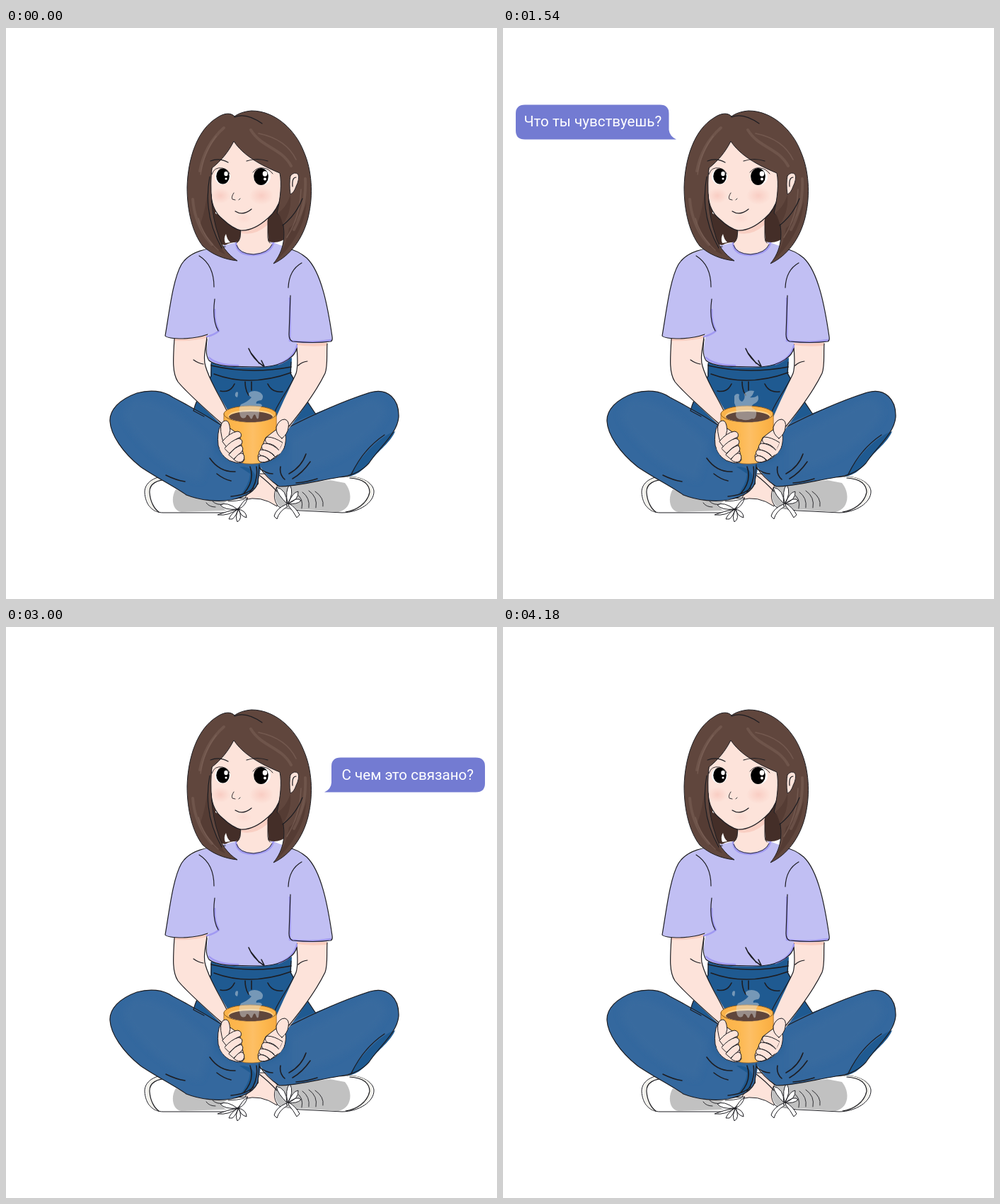
Write an HTML page that moves like this. It is 694 px wide and 807 px high and loops after 4270 ms.

```html
<!DOCTYPE html>
<html lang="ru">
<head>
<meta charset="utf-8">
<title>Что ты чувствуешь?</title>
<style>
html, body { margin: 0; width: 100%; height: 100%; overflow: hidden; background: #fff; }
svg { display: block; width: 694px; height: 807px; }
path, ellipse { stroke-linecap: round; stroke-linejoin: round; }
.ink { fill: none; stroke: #1d1d22; stroke-width: 1.2; }
.fine { stroke-width: .9; }
.bold { stroke-width: 1.6; }
.edge > * { stroke: #1d1d22; stroke-width: 1; }
.skin { fill: #fde3da; }
.denim { fill: #34689e; }
.shade { fill: #1f5a91; }
.hair { fill: #60463d; }
.gloss { fill: none; stroke: #80665c; }
.bubble { fill: #737bd2; animation: 4270ms linear infinite; opacity: 0; }
.bubble text { font: 400 20.6px Roboto, "Noto Sans", sans-serif; fill: #fff; }
#ask { animation-name: ask; }
#why { animation-name: why; }
.steam path { fill: #dde2e5; opacity: 0; }

@keyframes ask {
  0%, 23.42% { opacity: 0; transform: translateY(36px); }
  24.59% { opacity: .09; transform: translateY(33px); }
  31.15% { opacity: .8; transform: translateY(9px); }
  34.66%, 52.93% { opacity: 1; transform: none; }
  55.97% { opacity: .78; transform: translateY(-8.5px); }
  62.53% { opacity: .15; transform: translateY(-29.5px); }
  64.17%, 100% { opacity: 0; transform: translateY(-30px); }
}
@keyframes why {
  0%, 54.8% { opacity: 0; transform: translateY(36px); }
  55.97% { opacity: .09; transform: translateY(33px); }
  62.53% { opacity: .8; transform: translateY(9px); }
  66.04%, 85.48% { opacity: 1; transform: none; }
  88.29% { opacity: .78; transform: translateY(-6px); }
  93.68% { opacity: .14; transform: translateY(-23px); }
  95.32%, 100% { opacity: 0; transform: translateY(-23.5px); }
}
</style>
</head>
<body>
<svg viewBox="0 0 694 807">
  <defs>
    <radialGradient id="blush">
      <stop offset="0" stop-color="#f8c9bf" stop-opacity=".85"/>
      <stop offset="1" stop-color="#f8c9bf" stop-opacity="0"/>
    </radialGradient>
    <linearGradient id="mug">
      <stop offset="0" stop-color="#fbb147"/>
      <stop offset=".35" stop-color="#fdb850"/>
      <stop offset=".55" stop-color="#fdbf66"/>
      <stop offset=".75" stop-color="#fdb850"/>
      <stop offset="1" stop-color="#f9ac40"/>
    </linearGradient>
    <filter id="soft" x="-30%" y="-30%" width="160%" height="160%"><feGaussianBlur stdDeviation="5"/></filter>
  </defs>

  <!-- ankles and shoes -->
  <g class="edge">
    <path class="skin" d="M356 630L370 630Q377 640 386 650L383 676Q360 660 336 667Q342 655 356 645Z"/>
    <path fill="#fff" d="M240 634C215 630 196 640 196 656C197 675 208 685 222 685L310 685L327 680L342 664L300 666Q262 660 240 640Z"/>
    <path fill="#fff" d="M462 636C495 629 518 640 520 654C521 671 498 685 475 685L415 682L386 677C377 668 378 655 384 647Z"/>
  </g>
  <path fill="#f1f0ea" d="M237 635C212 632 197 642 198 656C199 673 207 683 217 684C207 676 203 667 202 656C202 645 212 637 237 639ZM484 634C506 634 518 644 518 655C518 669 500 683 478 684C499 679 513 668 513 655C513 644 503 637 484 636Z"/>
  <path fill="#c1c1c1" d="M240 652C232 665 236 683 248 684L312 682Q300 676 313 668C285 670 262 662 240 652ZM384 648C377 659 380 672 391 679L470 684C489 680 491 657 479 643L458 639Z"/>
  <path class="ink" stroke-width=".8" d="M236 638C212 637 202 645 203 657C204 670 210 680 216 684M486 636C505 637 514 645 514 656C511 672 495 682 480 684M358 632Q370 641 383 655"/>
  <path class="ink fine" d="M283 671Q287 677 296 677M292 669Q298 675 308 673M411 659Q421 665 418 679M419 656Q430 664 428 678M428 654Q441 663 438 678M437 655Q450 664 448 676M314 669Q326 669 337 666"/>
  <g class="edge" fill="#fff">
    <path d="M327 680Q312 669 303 674Q309 682 327 680ZM327 680Q312 683 299 688Q315 690 327 680ZM328 680Q318 686 315 694L320 694Q326 689 328 680ZM329 680Q323 690 327 698Q335 694 329 680ZM329 680Q340 683 340 692Q331 690 329 680ZM329 680Q333 670 341 665Q339 675 329 680Z"/>
    <path d="M397 672Q384 660 382 649Q397 652 397 672ZM398 672Q394 654 401 645Q408 658 398 672ZM399 672Q405 656 413 655Q414 667 399 672ZM399 672Q412 662 417 668Q411 674 399 672ZM396 673Q381 680 379 690L383 694Q386 683 397 677ZM400 676Q406 683 411 692L415 688Q410 678 400 672Z"/>
  </g>

  <!-- jeans -->
  <path class="shade" d="M290 472L289 492Q270 520 265 541L310 575L385 575L438 546Q420 520 403 488L404 466Q345 486 290 472Z"/>
  <path class="denim" d="M309 564C285 549 255 532 236 522C222 512 203 511 185 516C160 525 146 540 147 556C148 575 165 600 190 620C210 634 238 648 255 660C275 668 300 670 318 667C338 663 352 655 356 643L362 614L335 590Z"/>
  <path class="denim" d="M378 568C420 553 480 526 515 515C540 508 556 525 555 550C553 573 530 590 513 615C503 626 490 633 470 635C440 640 410 648 386 648Q368 636 356 614L362 590Z"/>
  <g filter="url(#soft)" fill="#3b6c9f" opacity=".7">
    <path d="M180 525C215 522 255 552 290 588L275 640C235 630 180 585 165 546Z"/>
    <path d="M405 580L510 525C530 520 546 540 530 558C505 590 460 620 405 628Z"/>
  </g>
  <path class="shade" d="M550 570C530 576 504 602 484 634C496 632 506 624 512 615C528 596 544 585 550 570ZM330 620Q352 619 354 640Q352 654 330 662Q344 645 345 630Z"/>
  <path class="ink" d="M307 563C285 549 255 532 236 522C222 512 203 511 185 516C160 525 146 540 147 556C148 575 165 600 190 620C210 634 238 648 255 660C275 668 300 670 318 667C338 663 352 655 356 643L358 617M396 566C435 546 480 526 515 515C540 508 556 525 555 550C553 573 530 590 513 615C503 626 490 633 470 635C440 640 410 648 386 648Q368 636 358 620M265 541Q270 520 290 492L290 474M403 472L402 488Q420 520 438 546M265 541L280 549M535 575Q505 595 488 631"/>
  <path class="ink bold" d="M290 477Q345 490 403 479M294 489Q345 508 403 487M303 513Q317 516 323 503M370 503Q376 516 391 514M338 500Q338 512 343 519M347 500L347 512M288 608Q302 628 324 627M298 630Q308 638 318 640M345 620Q352 640 336 658M354 620Q357 640 345 656M318 662Q340 660 350 650M424 602Q418 620 400 630M430 613Q419 629 405 637M388 620Q386 631 394 638M358 622Q368 630 377 630M410 643Q425 642 440 637M226 632Q240 639 253 641"/>

  <!-- arms -->
  <path class="skin" d="M238 436C236 470 235 488 243 500C255 515 280 537 308 564L318 548C305 525 288 500 282 478C278 465 283 450 285 430ZM454 443C453 462 455 478 451 488C438 515 415 545 394 574L378 560C390 530 402 508 410 488C414 475 411 460 411 443Z"/>
  <path fill="#f9cdbf" d="M238 438Q265 441 285 433L284 438Q262 443 238 442ZM411 445L454 445L454 449Q430 451 411 448Z"/>
  <path class="ink" d="M238 439C236 470 235 488 243 500C255 515 280 537 306 560M314 545C305 525 288 500 282 478C278 465 283 450 284 436M454 446C453 462 455 478 451 488C438 515 415 545 395 569M380 542C390 520 402 508 410 488C414 475 411 460 411 447M265 469Q272 474 279 475M413 477Q418 472 426 471"/>

  <!-- hair behind the neck -->
  <path fill="#442e28" d="M284 198L296 196L296 262L336 280L331 303Q318 302 310 307L296 304ZM368 262L395 240L398 295Q386 306 371 302Z"/>
  <path fill="#fff" d="M311 291Q307 297 310 304L317 303Q312 298 311 291Z"/>

  <!-- shirt -->
  <path fill="#c1bff3" d="M326 303C300 310 262 313 248 334C236 355 231 400 225 435Q228 439 250 439Q272 438 287 433Q281 462 287 470C300 481 335 480 365 479C395 477 409 462 411 453L411 445Q440 447 460 443Q462 440 460 432C455 395 446 345 425 325C412 314 392 309 378 303Z"/>
  <path fill="none" stroke="#a19af2" stroke-width="2.6" d="M295 398Q294 415 301 428Q294 434 284 436M401 382Q402 410 401 442Q430 446 459 441M287 466Q300 477 328 477M411 449Q407 467 385 475M325 304Q326 321 350 321Q374 319 378 304"/>
  <path class="skin" d="M333 278L331 295Q330 301 326 304Q330 319 350 319Q371 317 376 305Q370 303 370 295L370 262Z"/>
  <path fill="#f9cfc3" d="M333 283Q350 287 370 268L370 278Q352 294 333 290Z"/>
  <path class="ink fine" d="M332 285L331 296Q330 301 326 304M370 272L370 296Q370 302 373 304M326 307Q329 319 350 320Q371 318 376 306"/>
  <path class="ink" d="M310 309C285 311 260 315 248 334C236 355 231 400 225 435Q228 439 250 439Q272 438 285 433M273 322Q294 335 294 366M295 383Q291 413 300 428M284 440Q281 462 287 470C300 481 335 478 365 479C395 477 409 462 411 453M398 312Q412 314 425 325C446 345 455 395 461 436Q462 442 459 443Q435 446 405 443Q400 441 400 433L402 378M418 332Q400 342 399 367"/>
  <path class="ink bold" d="M343 453Q349 468 364 478M346 459L358 474M361 470L365 478"/>

  <!-- face -->
  <path class="skin" d="M322 158L294 190Q289 200 290 235Q291 258 306 270Q321 284 332 286Q350 287 370 269Q384 257 389 238L392 200Z"/>
  <ellipse cx="303" cy="237" rx="14" ry="11" fill="url(#blush)"/>
  <ellipse cx="361" cy="237" rx="17" ry="13" fill="url(#blush)"/>
  <ellipse cx="336" cy="269" rx="12" ry="7" fill="url(#blush)" opacity=".4"/>
  <path class="ink" d="M290 235Q291 258 306 270Q321 284 332 286Q350 287 370 269Q384 257 389 238"/>
  <g fill="#fff">
    <ellipse cx="306" cy="210" rx="11" ry="11"/>
    <ellipse cx="362" cy="210" rx="12" ry="12"/>
  </g>
  <ellipse cx="306.5" cy="209.5" rx="9.3" ry="11"/>
  <ellipse cx="360.5" cy="210" rx="10.3" ry="12"/>
  <g fill="#fff">
    <ellipse cx="311" cy="206" rx="2.7" ry="3.3"/><circle cx="311" cy="213" r="1.6"/>
    <ellipse cx="366" cy="206" rx="3.3" ry="3.7"/><circle cx="366" cy="213.5" r="2"/>
  </g>
  <path class="ink fine" d="M291 207Q294 196 306 198Q314 200 316 206M349 204Q355 196 364 198Q372 199 377 206"/>
  <path class="ink" d="M324 259Q335 266 347 256"/>
  <path class="ink fine" d="M322 233Q318 239 320 242L324 243M329 243L331 241"/>

  <!-- hair and ear -->
  <path class="hair" stroke="#1d1d22" stroke-width="1" d="M323 125C318 119 308 120 298 127C270 144 257 185 256 225C256 260 264 290 278 308C291 320 308 327 327 329C313 320 303 306 300 292C290 265 288 222 291 198C305 187 315 174 322 160C335 180 360 194 387 205C390 220 388 240 383 262C386 264 390 266 390 270C396 292 393 315 378 333C402 322 420 297 427 268C435 235 432 200 421 175C410 146 382 117 347 117C336 118 328 121 323 125Z"/>
  <path class="skin" stroke="#1d1d22" stroke-width=".9" d="M402 209Q408 202 413 207Q415 214 410 224Q407 233 402 235Q400 220 402 209Z"/>
  <path class="ink" stroke-width=".8" d="M405 224Q404 211 410 211"/>
  <path fill="#553c34" d="M402 236Q396 254 384 262Q389 266 391 278Q404 260 402 236ZM285 230Q282 275 310 320Q282 308 274 279Q282 258 285 230ZM425 245Q422 292 380 331Q397 308 400 283Q418 270 425 245Z"/>
  <path class="gloss" stroke-width="4" opacity=".45" d="M346 144C361 169 389 169 403 195M308 141Q281 165 274 202M264 242Q267 280 291 306M423 213Q425 252 407 285"/>
  <path class="gloss" stroke-width="1.5" opacity=".6" d="M357 149Q396 157 410 186M297 153Q279 177 275 207M272 269Q280 297 300 314M417 228Q416 266 397 296"/>
  <path class="ink" stroke-width=".8" d="M323 126Q339 119 362 135M288 210Q278 263 305 311M391 279Q410 264 419 241"/>
  <path class="ink" stroke-width=".7" d="M289 188Q301 183 314 190M340 188Q355 183 370 188"/>

  <!-- mug and hands -->
  <ellipse cx="346" cy="590" rx="47" ry="25" fill="#174e82" opacity=".45" filter="url(#soft)"/>
  <path fill="url(#mug)" stroke="#9a6827" stroke-width=".8" d="M308 545C307 570 312 594 322 607Q330 617 347 616Q365 617 373 605C381 591 383 568 382 545Z"/>
  <ellipse cx="345" cy="545.5" rx="37" ry="11.5" fill="#fbb34b" stroke="#87591f"/>
  <ellipse cx="346" cy="548.5" rx="32" ry="8.7" fill="#ffd28a"/>
  <ellipse cx="346" cy="549.5" rx="31" ry="7.5" fill="#60463c"/>
  <g class="edge skin">
    <path d="M303 562Q298 572 300 590Q306 611 324 614Q334 617 337 610L330 575L317 566Z"/>
    <path d="M305 578Q301 561 307 556Q314 552 316 562Q318 568 315 576L307 584Z"/>
    <path d="M306 584Q316 572 327 570Q334 571 332 578Q321 582 312 592Z"/>
    <path d="M309 594Q318 583 329 580Q336 582 333 588Q324 592 316 601Z"/>
    <path d="M315 603Q324 592 332 590Q337 594 333 599L322 609Z"/>
    <path d="M322 610Q329 600 334 601Q339 605 335 612Q329 616 322 610Z"/>
    <path d="M393 565Q398 580 393 594Q382 611 365 614Q356 613 356 605L367 579L380 569Z"/>
    <path d="M390 580Q381 574 382 564Q386 553 394 553Q401 555 399 565Q398 574 390 580Z"/>
    <path d="M391 586Q379 578 369 578Q364 582 369 587Q380 588 386 597Z"/>
    <path d="M387 598Q377 587 365 587Q359 590 363 596Q375 598 381 606Z"/>
    <path d="M380 606Q372 596 360 596Q355 601 360 604Q368 605 373 611Z"/>
    <path d="M372 611Q365 603 358 605Q354 609 359 613Q366 615 372 611Z"/>
  </g>
  <path class="skin" d="M301 574Q305 588 313 603L323 611Q308 610 302 595ZM394 575Q391 594 378 606L388 601Q396 591 394 575Z"/>

  <g class="steam">
    <path d="M324 517Q325 513 328 515Q328 519 327 522Q323 521 324 517ZM344 515Q351 511 359 515Q366 520 361 526Q352 527 354 531Q361 530 362 534Q357 538 358 543L357 551Q355 555 353 548Q351 544 349 549Q347 556 344 549Q340 544 339 550Q334 554 331 548Q328 538 332 532Q342 528 347 522Q341 519 344 515Z"/>
    <path d="M327 520Q330 515 334 518Q332 526 338 528Q343 524 341 517Q347 511 355 513Q353 520 349 522Q356 523 360 519Q363 526 357 530Q350 533 352 537Q359 539 358 546Q357 554 352 552Q344 556 337 553Q330 553 329 547Q331 537 327 530Z"/>
    <path d="M326 523Q327 514 334 513Q331 521 337 523Q345 520 344 514Q352 510 357 516Q350 519 352 524Q361 523 361 530Q353 533 356 539Q360 548 355 552Q345 555 338 552Q329 553 329 544Q333 535 326 523Z"/>
    <path d="M324 516Q328 511 331 516Q330 522 326 523Q322 521 324 516ZM339 517Q346 510 354 513Q348 517 351 521Q360 516 364 522Q363 530 355 531Q352 535 358 539Q359 551 353 552Q342 555 334 552Q328 546 331 537Q340 532 340 527Q335 523 339 517Z"/>
  </g>

  <g class="bubble" id="ask">
    <path d="M31 108.5H222Q234.5 108.5 234.5 121V144Q235.5 153 245 157.5H31Q18 157.5 18 145V121Q18 108.5 31 108.5Z"/>
    <text x="29.5" y="139">Что ты чувствуешь?</text>
  </g>
  <g class="bubble" id="why">
    <path d="M473 184.5H664Q677 184.5 677 197V221Q677 233.5 664 233.5H450Q459.5 229 460 220V197Q460 184.5 473 184.5Z"/>
    <text x="474.5" y="216">С чем это связано?</text>
  </g>
</svg>
<script>
const loop = 4270;
// The four puffs take turns, each switch being a hard cut.
const cuts = [0, 120, 270, 420, 670, 820, 970, 1120, 1270, 1420, 1600, 1680, 1750, 1910, 2060,
  2210, 2360, 2510, 2700, 2820, 2960, 3090, 3240, 3410, 3560, 3710, 3860, 4010, 4150, loop];

document.querySelectorAll('.steam path').forEach((puff, i) => {
  const poses = cuts.map((time, k) => ({
    offset: time / loop,
    opacity: k % 4 === i ? .46 : 0,
    easing: 'step-end'
  }));
  puff.animate(poses, { duration: loop, iterations: Infinity });
});
</script>
</body>
</html>
```
